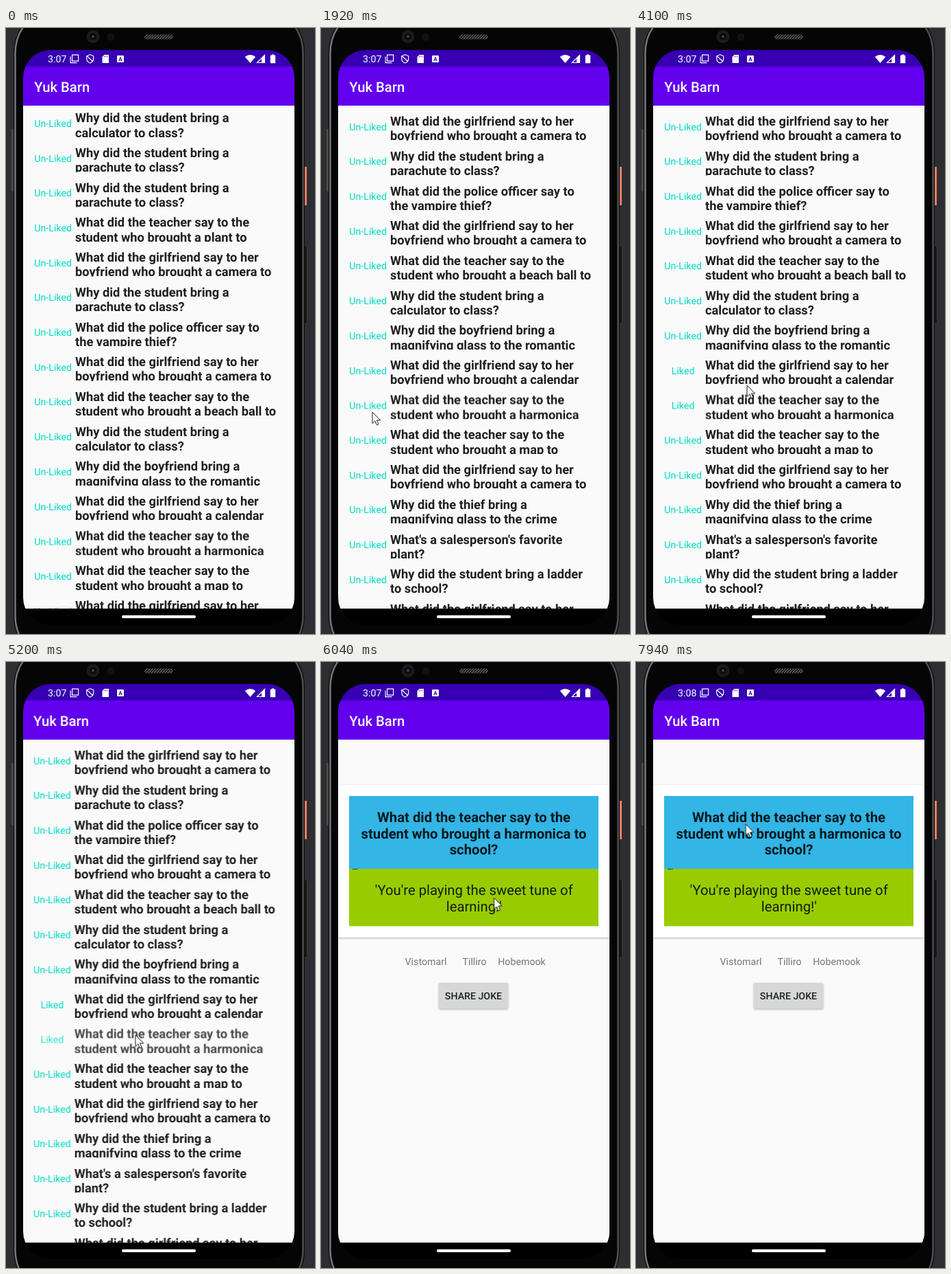
Recreate the animation shown at these times as an HTML page. Size 451 by 882 pixels, loop 8000 ms.

```html
<!DOCTYPE html>
<html lang="en">
<head>
<meta charset="utf-8">
<title>Joke list</title>
<style>
  html, body { margin: 0; width: 100%; height: 100%; overflow: hidden; background: #2d2e32; }
  svg { display: block; width: 451px; height: 882px; }
  text { font-family: Roboto, sans-serif; text-rendering: geometricPrecision; fill: #212121; }
  .bar { font-size: 20.28px; font-weight: 500; fill: #fff; }
  .clock { font-size: 14.2px; fill: #fff; }
  .joke { font-size: 18.27px; font-weight: 700; fill: #1f1f1f; }
  .like { font-size: 14.2px; fill: #03dac5; text-anchor: middle; }
  .big { font-size: 20.28px; text-anchor: middle; fill: rgba(0, 0, 0, .87); }
  .bold { font-weight: 700; }
  .link { font-size: 14.2px; fill: #757575; text-anchor: middle; }
  .card { filter: drop-shadow(0 1px 1.5px rgba(0, 0, 0, .3)); }
</style>
</head>
<body>
<svg viewBox="0 0 451 882">
  <defs>
    <clipPath id="screen"><rect x="25" y="32" width="396" height="837" rx="40"/></clipPath>
    <clipPath id="app"><rect x="25" y="56" width="396" height="789"/></clipPath>
    <clipPath id="rows"><rect x="-40" y="113" width="520" height="732"/></clipPath>
    <clipPath id="two"><rect x="95" y="117" width="330" height="42"/></clipPath>
    <linearGradient id="metal">
      <stop offset="0" stop-color="#77787a"/><stop offset=".5" stop-color="#2b2b2c"/><stop offset="1" stop-color="#4f5052"/>
    </linearGradient>
    <pattern id="mesh" width="4" height="4" patternUnits="userSpaceOnUse">
      <rect width="4" height="4" fill="#1c1c1c"/><path d="M0 4L4 0" stroke="#666" stroke-width="1.2"/>
    </pattern>
    <g id="header">
      <rect x="-40" y="56" width="520" height="57" fill="#6200ee"/>
      <text class="bar" x="41.200" y="93">Yuk Barn</text>
    </g>
  </defs>

  <!-- phone body -->
  <rect x="8" y="147" width="3" height="91" rx="1" fill="#48494b"/>
  <rect x="434" y="317" width="5.5" height="113" rx="2" fill="#161617" stroke="#47484a" stroke-width=".6"/>
  <rect x="435.5" y="202" width="3.5" height="56" fill="#e97f63"/>
  <rect x="11" y="-34" width="425" height="960" rx="70" fill="#0b0b0c"/>
  <rect x="13.5" y="-31.5" width="420" height="955" rx="68" fill="#050505" stroke="url(#metal)" stroke-width="2.500"/>
  <circle cx="127" cy="12.500" r="9.500" fill="#1b1b1d"/>
  <circle cx="127" cy="12.500" r="5" fill="#0a0b0e"/>
  <circle cx="127" cy="12.500" r="2" fill="#43474c"/>
  <circle cx="153" cy="13" r="5.500" fill="#111112"/>
  <rect x="202" y="9.500" width="42" height="7" rx="3.500" fill="url(#mesh)"/>

  <g clip-path="url(#screen)">
    <rect x="25" y="32" width="396" height="837" fill="#000"/>
    <rect x="25" y="32" width="396" height="24.500" fill="#3700b3"/>
    <g clip-path="url(#app)">
      <g class="list">
        <rect x="-40" y="56" width="520" height="789" fill="#fafafa"/>
        <g clip-path="url(#rows)"><g class="scroll"></g></g>
        <use href="#header"/>
      </g>
      <g class="page"><g class="enter">
        <rect x="-40" y="56" width="520" height="789" fill="#fafafa"/>
        <use href="#header"/>
        <rect class="card" x="25" y="179" width="396" height="222" fill="#fff"/>
        <rect x="41" y="195" width="364" height="106.500" fill="#33b5e5"/>
        <rect x="41" y="301" width="364" height="83.500" fill="#9c0"/>
        <path d="M46 301.500h8" stroke="#234d38"/>
        <text class="big bold" x="223" y="233">What did the teacher say to the</text>
        <text class="big bold" x="223" y="256.500">student who brought a harmonica to</text>
        <text class="big bold" x="223" y="280">school?</text>
        <text class="big" x="223.300" y="339">'You're playing the sweet tune of</text>
        <text class="big" x="223.300" y="362.700">learning!'</text>
        <text class="link" x="153" y="440.500">Vistomarl</text>
        <text class="link" x="224" y="440.500">Tilliro</text>
        <text class="link" x="293" y="440.500">Hobemook</text>
        <rect class="card" x="172" y="467" width="101" height="37.500" rx="2" fill="#d6d7d7"/>
        <text x="222.500" y="491" font-size="14.2" font-weight="500" text-anchor="middle">SHARE JOKE</text>
      </g></g>
    </g>

    <!-- status bar -->
    <text class="clock seven" x="61" y="49.500">3:07</text>
    <text class="clock eight" x="61" y="49.500">3:08</text>
    <g fill="none" stroke="#fff" stroke-width="1.200">
      <path d="M96.600 39.100h9v9h-9zM94.100 41.500v9.200h9.300"/>
      <path d="M122.700 38.800l5 2v3.700q0 4.500-5 6.500q-5-2-5-6.500v-3.700zM118.500 41l8.500 8"/>
      <path d="M377.500 39.500v11h-11z"/>
    </g>
    <g fill="#fff">
      <path d="M143.500 39h6.500v12h-9.500v-9z"/>
      <rect x="162" y="40" width="10" height="10" rx="1"/>
      <path d="M348.800 42q7.700-6 15.400 0l-7.700 9z"/>
      <path d="M373 44.500l4.500-5v11h-4.500z"/>
      <path d="M387.800 38.500h3.400v1.300h2v11.400h-7.400v-11.400h2z"/>
      <rect x="169" y="854.800" width="108" height="4.200" rx="2.100"/>
    </g>
    <path d="M143.500 40.500v2M145.700 40.500v2M147.900 40.500v2" stroke="#3700b3" stroke-width=".8"/>
    <text x="167" y="48" font-size="8" font-weight="700" text-anchor="middle" style="fill:#3700b3">A</text>
  </g>

  <g class="cursor">
    <circle class="press" r="12" fill="#f5e62e"/>
    <path class="arrow" d="M0 0v16.500l3.800-3.600 2.600 6 2.600-1.100-2.600-5.900h5.200z" fill="#fff" stroke="#1d1d1d"/>
  </g>
</svg>

<script>
const LOOP = 8000, TICK = 70, PITCH = 50.7;

const STUDENT = 'Why did the student bring a';
const taught = thing => ['What did the teacher say to the', `student who brought a ${thing}`];
const dated = thing => ['What did the girlfriend say to her', `boyfriend who brought a ${thing}`];

const jokes = [
  [STUDENT, 'calculator to class?'],
  [STUDENT, 'parachute to class?'],
  [STUDENT, 'parachute to class?'],
  taught('plant to'),
  dated('camera to'),
  [STUDENT, 'parachute to class?'],
  ['What did the police officer say to', 'the vampire thief?'],
  dated('camera to'),
  taught('beach ball to'),
  [STUDENT, 'calculator to class?'],
  ['Why did the boyfriend bring a', 'magnifying glass to the romantic'],
  dated('calendar'),
  taught('harmonica'),
  taught('map to'),
  dated('camera to'),
  ['Why did the thief bring a', 'magnifying glass to the crime'],
  ["What's a salesperson's favorite", 'plant?'],
  ['Why did the student bring a ladder', 'to school?'],
  dated('camera to')
];

const label = (name, word) => `<text class="like ${name}" x="68.6" y="143.9">${word}</text>`;

document.querySelector('.scroll').innerHTML = jokes.map(([top, bottom], i) => `
  <g transform="translate(0 ${(i * PITCH).toFixed(2)})"><g class="row${i}">
    ${label('off' + i, 'Un-Liked')}
    ${i === 11 || i === 12 ? label('on' + i, 'Liked') : ''}
    <g clip-path="url(#two)">
      <text class="joke" x="101" y="137.4">${top}</text>
      <text class="joke" x="101" y="158.5">${bottom}</text>
    </g>
  </g></g>`).join('');

let css = '';

// Each key [ms, ...values] holds until the next one.
function track(name, style, keys) {
  const frames = [...keys, [LOOP, ...keys[keys.length - 1].slice(1)]]
    .map(([ms, ...values]) => `${ms / LOOP * 100}%{${style(...values)}}`);
  css += `@keyframes ${name}{${frames.join('')}} .${name}{animation:${name} ${LOOP}ms step-end infinite}\n`;
}

const ease = p => p < .5 ? 4 * p ** 3 : 1 - 4 * (1 - p) ** 3;

// Eased moves [start, end, ...target], sampled once per tick.
function path(first, moves) {
  const keys = [[0, ...first]];
  let from = first;
  for (const [start, end, ...to] of moves) {
    const count = Math.round((end - start) / TICK);
    for (let i = 1; i <= count; i++) {
      const p = i / count;
      keys.push([start + (end - start) * p, ...from.map((v, k) => v + (to[k] - v) * ease(p))]);
    }
    from = to;
  }
  return keys;
}

// A widening turn around the open card.
function circle(start, end) {
  const count = Math.round((end - start) / TICK);
  return Array.from({ length: count + 1 }, (_, i) => {
    const p = i / count;
    const a = (79 + 509 * p) * Math.PI / 180;
    const r = .48 + .39 * p + .9 * p * (1 - p);
    return [start + (end - start) * p, 240 + 137 * r * Math.cos(a), 298 + 96 * r * Math.sin(a)];
  });
}

const fade = o => `opacity:${o}`;
const move = (x, y) => `transform:translate(${x.toFixed(2)}px,${y.toFixed(2)}px)`;
const slide = x => move(x, 0);
const rise = y => move(0, -y);

function swap(from, to, ms) {
  track(from, fade, [[0, 1], [ms, 0]]);
  track(to, fade, [[0, 0], [ms, 1]]);
}

track('scroll', rise, path([0], [[740, 1510, 198]]));

track('cursor', move, [
  ...path([290, 560], [
    [320, 740, 205, 618.5],
    [740, 1510, 194, 413.5],
    [1510, 1920, 75, 559],
    [1980, 2120, 70, 550],
    [2530, 3010, 84, 497],
    [3230, 3440, 81, 451],
    [3570, 3900, 163, 541],
    [4030, 4310, 146, 204],
    [4310, 4590, 189, 543],
    [5410, 5970, 250, 345]
  ]),
  ...circle(6040, 7940)
]);

const presses = [[740, 1510], [2320, 2450], [3010, 3230], [4800, 4930]];
track('press', fade, [[0, 0], ...presses.flatMap(([down, up]) => [[down, .75], [up, 0]])]);
track('arrow', fade, [[0, 0], [390, 1]]);

swap('off12', 'on12', 2450);
swap('off11', 'on11', 3230);
swap('seven', 'eight', 6390);

track('row12', fade, [[0, 1], [5130, .9], [5200, .8]]);
track('list', slide, path([0], [[5060, 5760, -40]]));
track('enter', slide, path([40], [[5060, 5760, 0]]));
track('page', fade, [[0, 0], [5270, .4], [5340, 1]]);

document.head.appendChild(document.createElement('style')).textContent = css;
</script>
</body>
</html>
```
